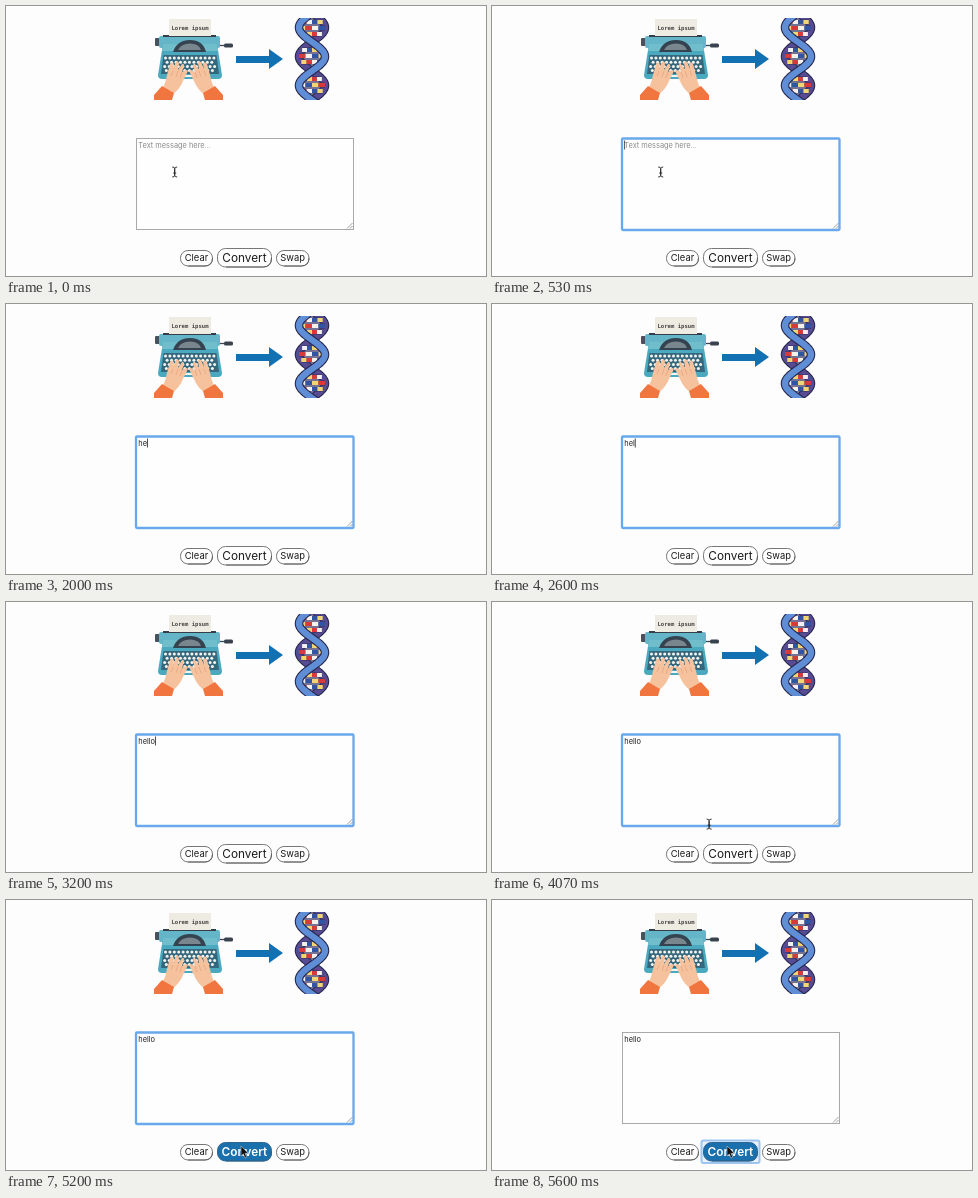
Animation, 480 px wide and 270 px high, one loop 5740 ms. Source, as an HTML page:

```html
<!DOCTYPE html>
<html lang="en">
<head>
<meta charset="utf-8">
<style>
html, body { margin: 0; width: 100%; height: 100%; overflow: hidden; background: #fdfdfd; }
svg { display: block; width: 480px; height: 270px; font-family: Inter, "Liberation Sans", sans-serif; }
.btn rect { fill: #fefefe; stroke: #777; }
.btn path { fill: none; stroke: #555; stroke-width: .8; }
.btn text { text-anchor: middle; fill: #1b1b1b; }
.hover rect { fill: #1a70ad; stroke: #2d6692; }
.hover path { stroke: #2d5f86; }
.hover text { fill: #fff; font-weight: 600; }
</style>
</head>
<body>
<svg viewBox="0 0 480 270">
  <g id="typewriter">
    <path d="M212 39.500H224" stroke="#3d4650" stroke-width="1.300"/>
    <rect x="218" y="37.500" width="9" height="4" rx="1.500" fill="#39434f"/>
    <rect x="149" y="32" width="5" height="8" rx="1" fill="#48525c"/>
    <rect x="153" y="30" width="61" height="12" rx="2" fill="#63b5c7"/>
    <path d="M157 30H210" stroke="#353f49" stroke-width="2"/>
    <path d="M163 13H205V30H163Z" fill="#eeece2"/>
    <text x="184" y="24" text-anchor="middle" font-size="5.6" font-weight="700" fill="#454545" font-family="'DejaVu Sans Mono', 'Liberation Mono', monospace">Lorem ipsum</text>
    <path d="M157 38H211L216 69Q216 73 212 73H156Q152 73 152 69Z" fill="#4ba9bf"/>
    <path d="M157 38H211L212 45H156Z" fill="#70bdcc"/>
    <path d="M167 46Q171 34 184 34T200 46Z" fill="#34434f"/>
    <path d="M172 44Q175 37.500 184 37.500T195 44Z" fill="#79868e"/>
    <path d="M157.500 49H210.500L213 68H155Z" fill="#35677d"/>
    <g id="keys" stroke="#f4f4ef" stroke-width="3" stroke-linecap="round"/>
    <g id="hand">
      <path d="M156 84Q160 76 161 69L164 58Q166 55 168 58L167 63L170 56Q172 54 173 57L172 64L176 58Q178 57 178 60L176 66L180 64Q183 64 181 67L177 75Q174 83 166 89Z" fill="#f6c29d"/>
      <path d="M167 65L165 70M172 65L170 71M176 66L174 72" fill="none" stroke="#dd9b78" stroke-width=".6"/>
      <path d="M156 80L168 87L166 94H148V89Z" fill="#f1753f"/>
    </g>
    <use href="#hand" transform="matrix(-1 0 0 1 365 0)"/>
  </g>
  <path d="M230 50H263V43L277 53L263 63V57H230Z" fill="#1271b3"/>
  <clipPath id="dnaBox"><path d="M288 12H324V94H288Z"/></clipPath>
  <g id="dna" clip-path="url(#dnaBox)" fill="none"/>

  <rect x="130.500" y="132.500" width="217" height="91" fill="#fefefe" stroke="#a9a9a9"/>
  <path d="M341 222.500L346.500 217M344 222.500L346.500 220" stroke="#777" stroke-width=".7"/>
  <rect id="focus" x="130" y="132.500" width="217.500" height="91.500" rx="1" fill="none" stroke="#69a8eb" stroke-width="2.300"/>
  <text id="message" x="132.300" y="142" font-size="7.400"></text>
  <path id="caret" d="M0 134.500V143.500" stroke="#222" stroke-width=".8"/>

  <g class="btn">
    <rect x="174.500" y="244.500" width="32" height="15.500" rx="7.500"/>
    <path d="M182 260H199Q206.500 260 206.500 252"/>
    <text x="190.500" y="255.400" font-size="9.400">Clear</text>
  </g>
  <rect id="ring" x="209.500" y="240.500" width="58" height="22.500" rx="2" fill="#e9f1fa" stroke="#9dc5f0" stroke-width="2"/>
  <g class="btn" id="convert">
    <rect x="211.500" y="242.500" width="54" height="18.500" rx="8"/>
    <path d="M220 261H257.500Q265.500 261 265.500 252"/>
    <text x="238.400" y="255.600" font-size="11.800">Convert</text>
  </g>
  <g class="btn">
    <rect x="270.500" y="244.500" width="32.500" height="15.500" rx="7.500"/>
    <path d="M278 260H295.500Q303 260 303 252"/>
    <text x="286.700" y="255.400" font-size="9.400">Swap</text>
  </g>

  <path id="beam" d="M-2.500 -5Q0 -5 0 -3.500V3.500Q0 5 -2.500 5M2.500 -5Q0 -5 0 -3.500V3.500Q0 5 2.500 5M-1.500 1H1.500" fill="none" stroke="#222" stroke-width=".9"/>
  <path id="arrow" d="M0 0V10L2.300 8L4 12L5.700 11.300L4 7.300H7.300Z" fill="#111" stroke="#ccc" stroke-width=".6"/>
</svg>
<script>
const $ = id => document.getElementById(id);
const LOOP = 5740, FOCUS = 130, SHOW = 3680, HOVER = 4290, PRESS = 5330;
const keyTimes = [1720, 1950, 2350, 2720, 3100];
const path = [[SHOW, 168.700, 166], [4070, 217, 222], [4380, 235, 246]];

function drawKeys() {
  let out = '';
  for (let row = 0; row < 4; row++)
    for (let i = 0; i < 12 - row % 2; i++) {
      const x = 159.5 - row * .4 + (row % 2) * 2 + i * (4.4 + row * .07);
      out += `<path d="M${x} ${52 + row * 4.2}h.01"/>`;
    }
  $('keys').innerHTML = out + '<path d="M172 70H196" stroke-width="2"/>';
}

function drawDna() {
  const offset = y => 13 * Math.sin(Math.PI * (y - 36) / 29);
  const strand = (side, color) => {
    let d = '';
    for (let y = 4; y <= 102; y++) d += `${d ? 'L' : 'M'}${306 + side * offset(y)} ${y}`;
    return `<path d="${d}" stroke="#28284f" stroke-width="8.5"/><path d="${d}" stroke="${color}" stroke-width="6.3"/>`;
  };
  const colors = ['#d83a3c', '#f4f1ed', '#3155a4', '#f2d575'];
  let rungs = '';
  [16, 22, 28, 44, 50, 56, 73, 79, 85].forEach((y, i) => {
    const w = Math.abs(offset(y));
    rungs += `<path d="M${306 - w} ${y}h${2 * w}" stroke="#3b3768" stroke-width="5.4"/>`;
    for (let k = 0; k < 4; k++)
      rungs += `<path d="M${306 - w + k * w / 2} ${y}h${w / 2}" stroke="${colors[(k + i * 3) % 4]}" stroke-width="4"/>`;
  });
  $('dna').innerHTML = strand(-1, '#574c94') + rungs + strand(1, '#5f8ed6');
}

function pointer(t) {
  if (t <= path[0][0]) return path[0].slice(1);
  for (let i = 1; i < path.length; i++) {
    const [t0, x0, y0] = path[i - 1], [t1, x1, y1] = path[i];
    if (t < t1) {
      const p = (t - t0) / (t1 - t0), e = i === 1 ? p * p * (2 - p) : p * (2 - p);
      return [x0 + (x1 - x0) * e, y0 + (y1 - y0) * e];
    }
  }
  return path[path.length - 1].slice(1);
}

const show = (id, on) => $(id).setAttribute('visibility', on ? 'visible' : 'hidden');

function render(t) {
  const count = keyTimes.filter(k => k <= t).length;
  const focused = t >= FOCUS && t < PRESS;
  const text = $('message');
  text.textContent = count ? 'hello'.slice(0, count) : 'Text message here...';
  text.setAttribute('fill', count ? '#222' : '#8b8b8b');
  const caretX = 132.6 + (count ? text.getComputedTextLength() + .2 : 0);
  $('caret').setAttribute('transform', `translate(${caretX})`);
  const blinkStart = count ? keyTimes[count - 1] : FOCUS;
  show('focus', focused);
  show('caret', focused && (t - blinkStart) % 1060 < 530);

  const [x, y] = pointer(t), overButton = t >= HOVER;
  for (const id of ['beam', 'arrow']) $(id).setAttribute('transform', `translate(${x} ${y})`);
  const outside = y > 225;
  show('beam', !outside && (t < keyTimes[0] || t >= SHOW));
  show('arrow', outside);
  $('convert').classList.toggle('hover', overButton);
  show('ring', t >= PRESS);
}

function tick() {
  render(performance.now() % LOOP);
  requestAnimationFrame(tick);
}
drawKeys();
drawDna();
tick();
</script>
</body>
</html>
```
